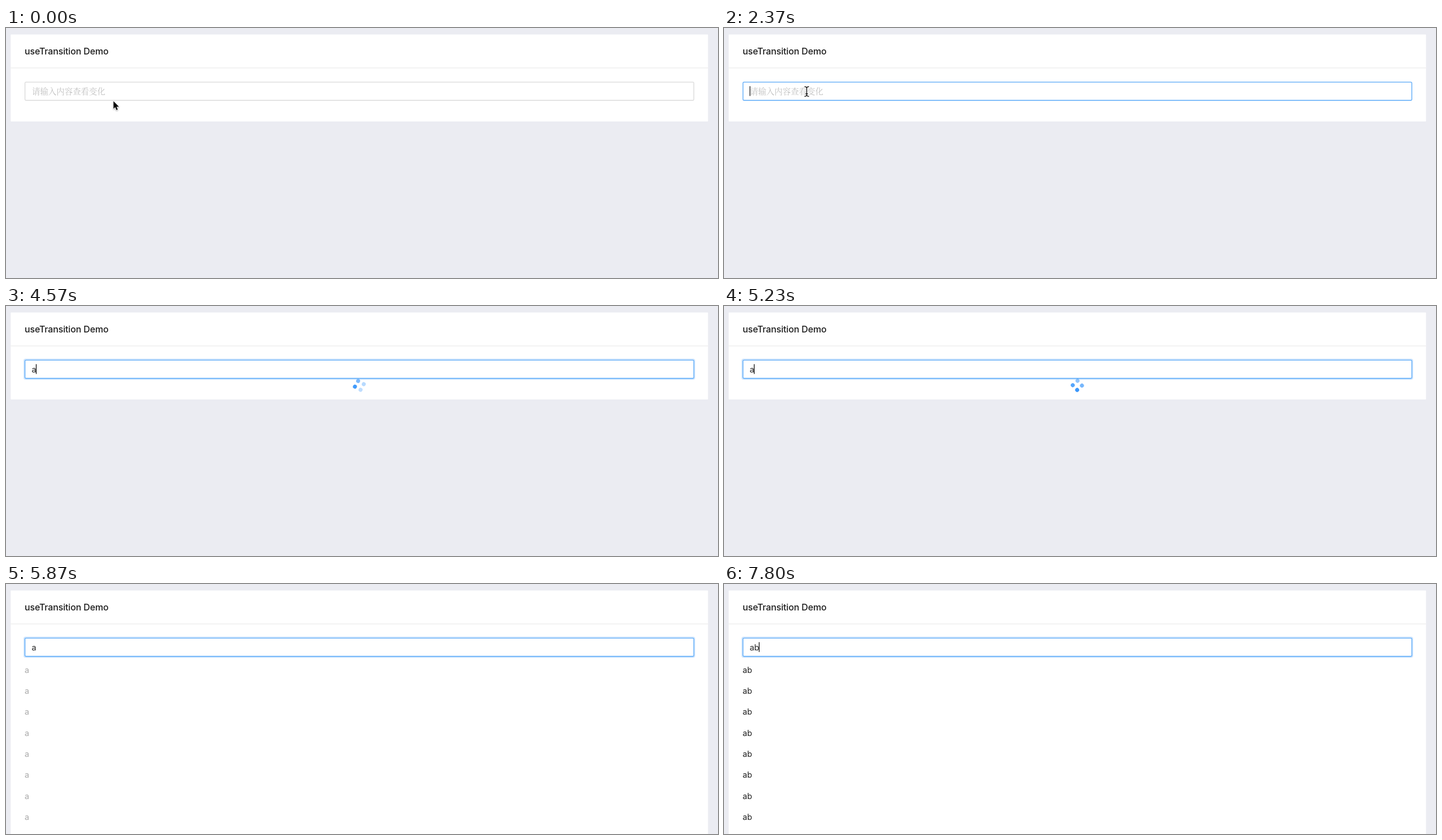
An HTML page for the animation above (8 s loop, 1261 px wide and 444 px high).

```html
<!DOCTYPE html>
<html lang="zh">
<head>
<meta charset="utf-8">
<title>useTransition Demo</title>
<style>
  html, body { margin: 0; width: 100%; height: 100%; overflow: hidden; background: #ebecf2; }
  svg { display: block; width: 100vw; height: 100vh; }
  text { font: 14.4px Inter, "Open Sans", sans-serif; fill: #222; }
  .title { font-size: 16px; font-weight: 500; letter-spacing: -.15px; fill: #1c1c1c; }
  .placeholder { font: 14.45px "Noto Serif CJK SC", "Noto Sans CJK SC", "Noto Sans CJK", serif; fill: #bfbfbf; }
  .arrow { filter: drop-shadow(0 1px 1px rgba(0, 0, 0, .35)); }
</style>
</head>
<body>
<svg viewBox="0 0 1261 444" preserveAspectRatio="none">
  <rect id="card" x="8.3" y="11.5" width="1235" height="154.5" rx="1" fill="#fff"/>
  <rect x="8.3" y="70.3" width="1235" height="1.2" fill="#ebebeb"/>
  <text class="title" x="33" y="47.3">useTransition Demo</text>

  <rect id="glow" x="32" y="94.5" width="1187.5" height="35.5" rx="3" fill="none" stroke="#d0e6fd" stroke-width="2.2"/>
  <rect id="field" x="33.6" y="96.1" width="1184.6" height="32.4" rx="1.8" fill="#fff" stroke-width="1.3"/>
  <text class="placeholder" id="placeholder" x="46" y="118">请输入内容查看变化</text>
  <text id="value" x="45.5" y="117.6"></text>
  <rect id="caret" y="103.3" width="1.2" height="17.4" fill="#000"/>

  <g id="list"></g>
  <g id="spinner" fill="#2b8ffb"></g>

  <g id="pointer">
    <path class="arrow" id="arrow" d="M0 0V13.4L3 10.6 5.2 15.8 7.5 14.8 5.3 9.8H9.5Z"
      stroke="#fff" stroke-width="1.6" stroke-linejoin="round" paint-order="stroke"/>
    <g id="beam" fill="none">
      <path id="beamShape" d="M-4 -8.7Q-.3 -8.7 0 -6Q.3 -8.7 4 -8.7M0 -6V6M-4 8.7Q-.3 8.7 0 6Q.3 8.7 4 8.7M-2.2 4H2.2"
        stroke="#fff" stroke-width="2.8"/>
      <use href="#beamShape"/>
      <path d="M-4 -8.7Q-.3 -8.7 0 -6Q.3 -8.7 4 -8.7M0 -6V6M-4 8.7Q-.3 8.7 0 6Q.3 8.7 4 8.7M-2.2 4H2.2"
        stroke="#000" stroke-width="1.3"/>
    </g>
  </g>
</svg>
<script>
const LOOP = 8000;
const HOVER = 1670, FOCUS = 2370, TYPE_A = 3700, SHOW_A = 5845, TYPE_B = 6870, SHOW_B = 7310;
const $ = id => document.getElementById(id);
const clamp = v => Math.min(1, Math.max(0, v));
const mix = (a, b, p) => a + (b - a) * p;
const within = (t, from, to) => t >= from && t < to;
const show = (el, on) => el.setAttribute('visibility', on ? 'visible' : 'hidden');

// Solves a CSS cubic-bezier for the given progress.
function bezier(x1, y1, x2, y2) {
  const axis = (a, b, s) => 3 * a * s * (1 - s) ** 2 + 3 * b * s * s * (1 - s) + s ** 3;
  return x => {
    let lo = 0, hi = 1;
    for (let i = 0; i < 20; i++) {
      const mid = (lo + hi) / 2;
      if (axis(x1, x2, mid) < x) lo = mid; else hi = mid;
    }
    return axis(y1, y2, lo);
  };
}
const ease = bezier(.25, .1, .25, 1);
const smooth = bezier(.4, 0, .5, 1);
const eased = (t, start, length) => ease(clamp((t - start) / length));

// start, end, x, y
const MOVES = [
  [0, 100, 190, 129.7],
  [400, 600, 202, 132],
  [770, 1270, 172.7, 115.5],
  [HOVER, 2000, 146.5, 112.8]
];
const CARET_ON = [[FOCUS, 2870], [3370, 5730], [6230, 7300], [7800, LOOP]];

function make(tag, parent, attrs) {
  const el = document.createElementNS('http://www.w3.org/2000/svg', tag);
  for (const key in attrs) el.setAttribute(key, attrs[key]);
  return parent.appendChild(el);
}
const rows = Array.from({ length: 8 }, (_, i) => make('text', $('list'), { x: 33, y: 157.7 + i * 37.33 }));
const dots = Array.from({ length: 4 }, (_, i) => make('circle', $('spinner'), {
  cx: i === 1 || i === 2 ? 5.75 : -5.75, cy: i > 1 ? 5.75 : -5.75, r: 3.55
}));

function drawPointer(t) {
  let x = 190.4, y = 130;
  for (const [start, end, toX, toY] of MOVES) {
    const p = smooth(clamp((t - start) / (end - start)));
    x = mix(x, toX, p);
    y = mix(y, toY, p);
  }
  $('pointer').setAttribute('transform', `translate(${x} ${y})`);
  show($('arrow'), t < HOVER);
  show($('beam'), within(t, HOVER, TYPE_A));
}

function drawField(t) {
  const hover = eased(t, HOVER, 300);
  const channels = [[217, 84], [217, 166], [217, 248]].map(([a, b]) => Math.round(mix(a, b, hover)));
  $('field').setAttribute('stroke', `rgb(${channels})`);
  $('glow').setAttribute('opacity', eased(t, FOCUS, 220));
  show($('placeholder'), t < TYPE_A);
  $('value').textContent = t < TYPE_A ? '' : t < TYPE_B ? 'a' : 'ab';
  $('caret').setAttribute('x', t < TYPE_A ? 45.4 : t < TYPE_B ? 52.9 : 61.7);
  show($('caret'), CARET_ON.some(([from, to]) => within(t, from, to)));
}

function drawList(t) {
  const listed = t >= SHOW_A;
  $('card').setAttribute('height', listed ? 440 : 154.5);
  show($('list'), listed);
  const clear = t < TYPE_B ? eased(t, SHOW_A, 200)
    : t < SHOW_B ? 1 - eased(t, TYPE_B, 300)
    : eased(t, SHOW_B, 200);
  // The dimmed list is half transparent beneath a 40% white veil.
  $('list').setAttribute('opacity', mix(.5, 1, clear) * mix(.6, 1, clear));
  const label = t < SHOW_B ? 'a' : 'ab';
  rows.forEach(row => { row.textContent = label; });
}

function drawSpinner(t) {
  const second = t >= TYPE_B;
  show($('spinner'), within(t, TYPE_A, SHOW_A) || within(t, TYPE_B, SHOW_B));
  const age = Math.max(0, t - (second ? TYPE_B : TYPE_A) - 23);
  $('spinner').setAttribute('transform',
    `translate(625.8 ${second ? 337 : 141}) rotate(${45 + age * .3})`);
  dots.forEach((dot, i) => {
    const phase = Math.max(0, age - i * 400) / 1000 % 2;
    dot.setAttribute('opacity', mix(.3, 1, phase < 1 ? phase : 2 - phase));
  });
}

const began = performance.now();
function frame() {
  const t = (performance.now() - began) % LOOP;
  drawPointer(t);
  drawField(t);
  drawList(t);
  drawSpinner(t);
  requestAnimationFrame(frame);
}
frame();
</script>
</body>
</html>
```
